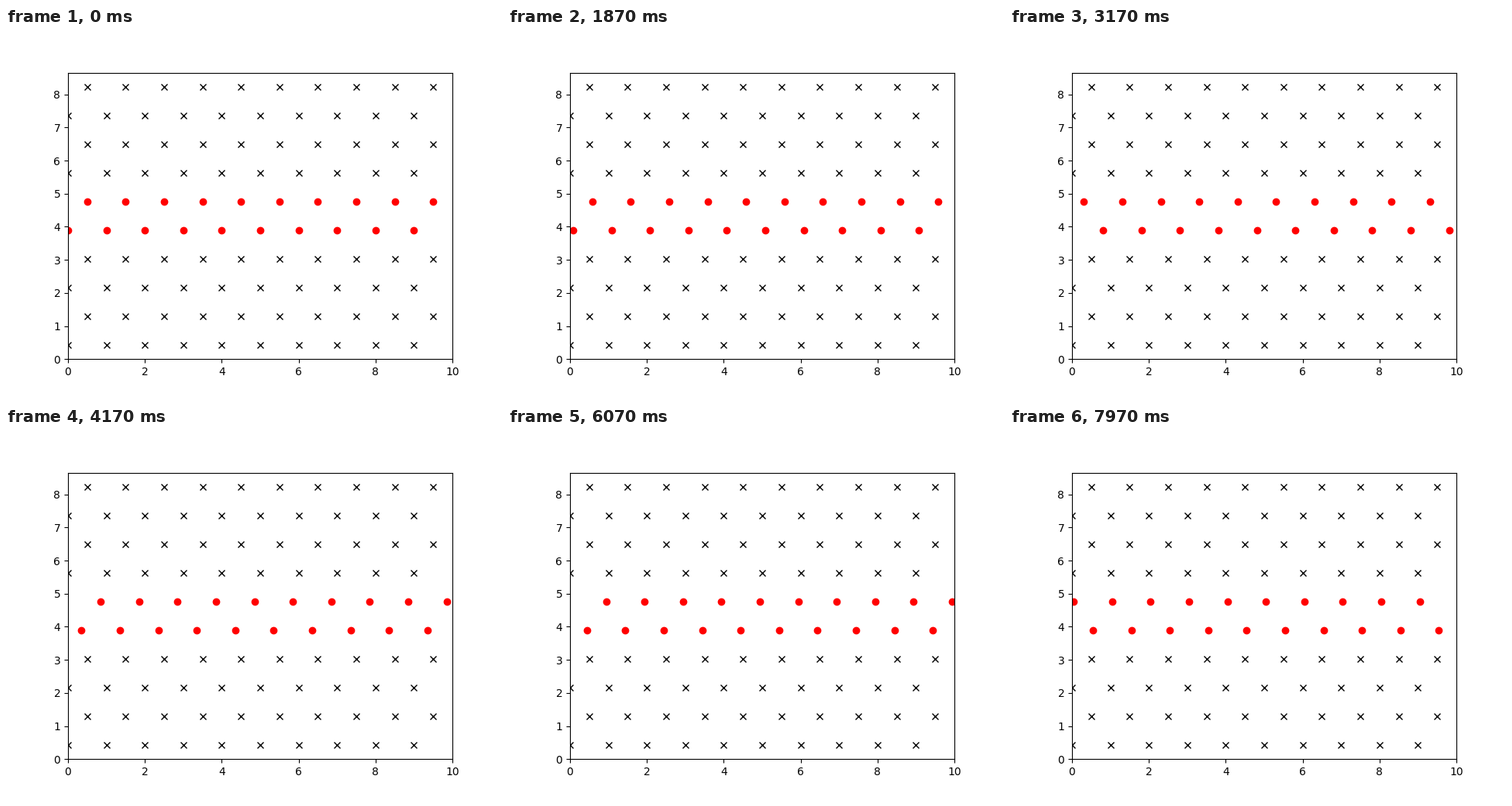
These frames come from a looping animation (640 by 480 pixels, 8 s). A matplotlib script:

```python
import numpy as np
import matplotlib.pyplot as plt
from matplotlib.animation import FuncAnimation

COLS, ROWS = 10, 10
ROW_GAP = np.sqrt(3) / 2
SLIDING = (4, 5)

FRAMES = 240
LOOP_MS = 8000
PERIOD = 51.71   # frames per lattice step
DRAG = 0.25      # strength of the lattice force relative to the drive


def slide(n):
    """Closed form of dx/dt = F * (1 - DRAG * sin(2 pi x)), x(0) = 0."""
    phase = np.pi * n / PERIOD - np.arcsin(DRAG)
    turns = np.round(phase / np.pi)
    root = np.sqrt(1 - DRAG ** 2)
    return np.arctan(DRAG + root * np.tan(phase)) / np.pi + turns


def lattice(rows):
    col, row = np.meshgrid(np.arange(COLS), rows)
    return (col + 0.5 * (row % 2)).ravel(), ((row + 0.5) * ROW_GAP).ravel()


fixed_x, fixed_y = lattice([r for r in range(ROWS) if r not in SLIDING])
slide_x, slide_y = lattice(SLIDING)

fig, ax = plt.subplots(figsize=(6.4, 4.8), dpi=100)
ax.set_xlim(0, COLS)
ax.set_ylim(0, ROWS * ROW_GAP)
ax.plot(fixed_x, fixed_y, "kx")
dots, = ax.plot(slide_x, slide_y, "ro")


def update(n):
    dots.set_data((slide_x + slide(n)) % COLS, slide_y)
    return dots,


anim = FuncAnimation(fig, update, frames=FRAMES, interval=LOOP_MS / FRAMES,
                     init_func=lambda: update(0), repeat=True, repeat_delay=0)
plt.show()
```
